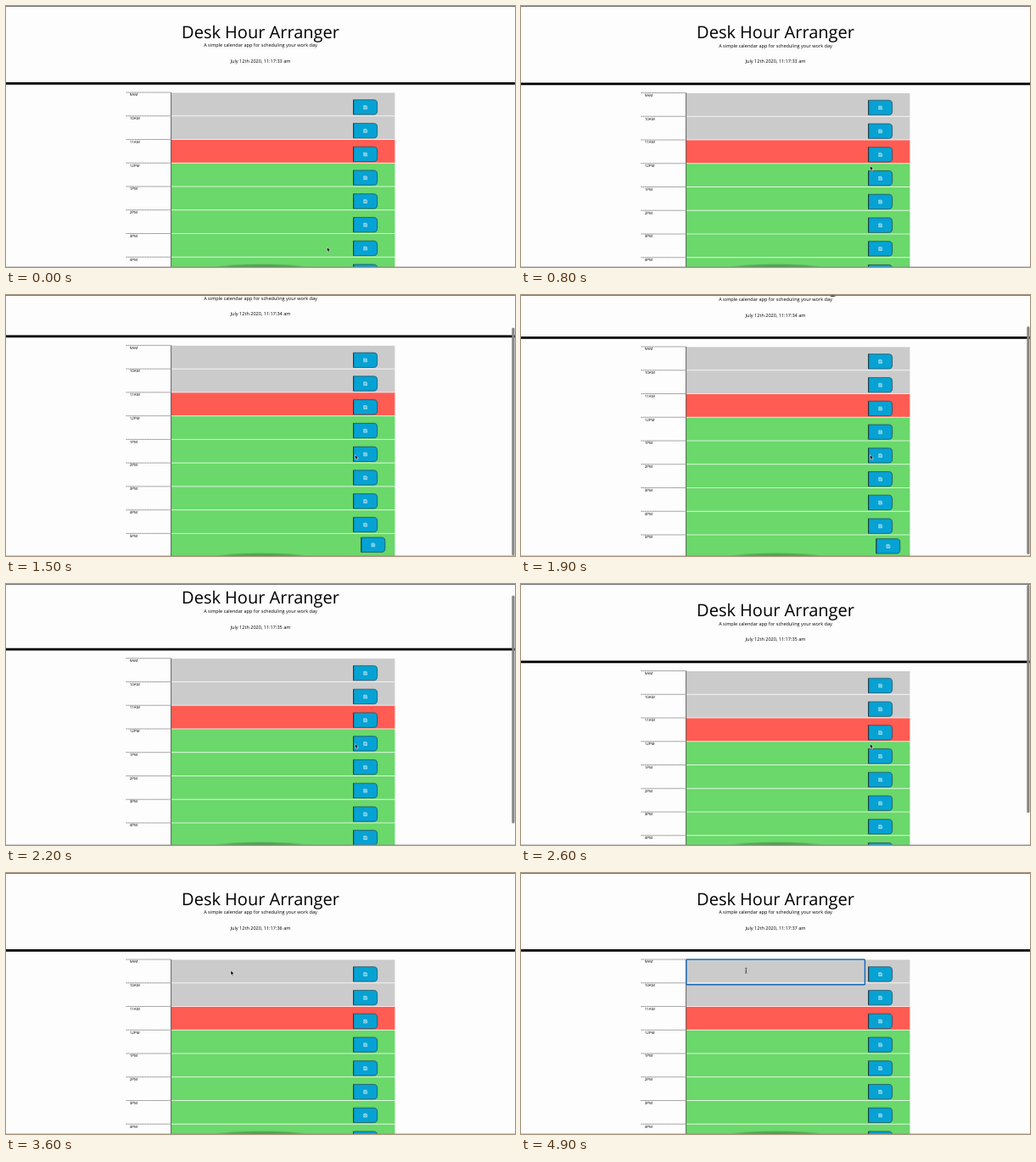
Recreate the animation shown at these times as an HTML page. Size 600 px wide and 308 px high, loop 5 s.

```html
<!DOCTYPE html>
<html lang="en">
<head>
<meta charset="utf-8">
<title>Day planner</title>
<style>
  html, body { margin: 0; width: 100%; height: 100%; overflow: hidden; background: #fdfdfd; }
  svg { display: block; width: 100vw; height: 100vh; }
  text { font-family: "Open Sans", "Noto Sans", sans-serif; fill: #000; text-rendering: geometricPrecision; }
  .middle { text-anchor: middle; }
</style>
</head>
<body>
<svg id="stage" viewBox="0 0 600 308">
  <defs>
    <radialGradient id="shade">
      <stop offset="0" stop-color="#000" stop-opacity=".3"/>
      <stop offset=".7" stop-color="#000" stop-opacity=".2"/>
      <stop offset="1" stop-color="#000" stop-opacity="0"/>
    </radialGradient>
    <g id="save">
      <path d="M0 0H23.8Q28 0 28 4.2V13.2Q28 17.4 23.8 17.4H0Z" fill="#06a2d3" stroke="#1d4657" stroke-width=".7"/>
      <path d="M0 0V17.4" stroke="#111" stroke-width=".6"/>
      <path d="M12.1 6.9h3.1l.8.8v3.1h-3.9z M12.9 7v1.3h2V7 M13 10.7V9.4h2v1.3" fill="none" stroke="#e8f7fc" stroke-width=".55"/>
    </g>
  </defs>
  <rect width="600" height="308" fill="#fdfdfd"/>
  <g id="page">
    <text class="middle" x="300" y="37.5" font-size="20">Desk Hour Arranger</text>
    <text class="middle" x="300" y="48.3" font-size="5.56">A simple calendar app for scheduling your work day</text>
    <text class="middle" id="clock" x="300" y="66.9" font-size="5.56"></text>
    <rect y="90" width="600" height="2.8"/>
    <g id="rows"></g>
  </g>
  <rect id="ring" x="194.8" y="102" width="210.6" height="29.8" rx=".8" fill="none" stroke="#1667b7" stroke-width="1.4"/>
  <ellipse cx="301" cy="308" rx="55" ry="4" fill="url(#shade)"/>
  <rect width="600" height="1" fill="#777"/>
  <rect y="307.3" width="600" height=".7" fill="#888" opacity=".6"/>
  <rect id="thumb" x="596.3" width="3.2" height="269" rx="1.6" fill="#858585"/>
  <path id="arrow" d="M0 0V5.6L1.3 4.4L2.2 6.4L3.1 6L2.2 4.1H4Z" fill="#000" stroke="#fff" stroke-width=".5"/>
  <path id="beam" d="M264.2 112.2q1.1 0 1.1 .8q0-.8 1.1-.8M265.3 113V117.4M264.2 118.2q1.1 0 1.1-.8q0 .8 1.1 .8M264.6 115.8h1.4" fill="none" stroke="#222" stroke-width=".65"/>
</svg>
<script>
const LOOP = 5000, STEP = 100;
const ROW_TOP = 102, ROW_HEIGHT = 27.75;
const HOURS = ["9AM", "10AM", "11AM", "12PM", "1PM", "2PM", "3PM", "4PM", "5PM"];
const SCROLL = [
  [600, 0], [700, -0.5], [1100, -0.5], [1200, 4], [1300, 18], [1400, 33],
  [1500, 42.6], [1700, 43], [1800, 42.6], [1900, 41], [2000, 36], [2100, 27],
  [2200, 14.3], [2300, 0], [2400, -0.5], [2900, -0.5], [3000, 0]
];
const POINTER_X = [[0, 378.5], [100, 381], [300, 396], [500, 409], [600, 411.5],
  [2800, 411.5], [2900, 404], [3100, 350], [3300, 288], [3400, 272], [3600, 265]];
const POINTER_Y = [[0, 284.5], [100, 278], [300, 236], [500, 196], [600, 188.5],
  [2800, 188.5], [2900, 184], [3100, 158], [3300, 128], [3400, 120], [3600, 115]];
const SCROLLBAR = [[1100, 0], [1200, 1], [2900, 1], [3200, 0]];

const byId = id => document.getElementById(id);
const show = (id, visible) => byId(id).setAttribute("visibility", visible ? "visible" : "hidden");

function valueAt(keys, time) {
  const next = keys.findIndex(key => key[0] > time);
  if (next === 0) return keys[0][1];
  if (next < 0) return keys[keys.length - 1][1];
  const [t0, a] = keys[next - 1], [t1, b] = keys[next];
  return a + (b - a) * (time - t0) / (t1 - t0);
}

function rowColor(index) {
  return index < 2 ? "#cbcbcb" : index === 2 ? "#ff5c53" : "#6ad86a";
}

function rowMarkup(hour, index) {
  const y = ROW_TOP + index * ROW_HEIGHT;
  const last = index === HOURS.length - 1;
  const saveX = last ? 418.8 : 409.6;
  const saveY = y + (last ? 4.7 : 8.7);
  return `
    <rect x="194.5" y="${y}" width="263.9" height="${ROW_HEIGHT}" fill="${rowColor(index)}"/>
    <path d="M195 ${y}H458.4" stroke="#fff" stroke-width=".8" opacity=".9"/>
    <path d="M141.6 ${y}H194.4" stroke="#333" stroke-width=".7" stroke-dasharray="1.2 .8"/>
    <path d="M194.6 ${y}v${ROW_HEIGHT}" stroke="#333" stroke-width=".7"/>
    <text x="145.8" y="${y + 4.3}" font-size="4.44">${hour}</text>
    <use href="#save" x="${saveX}" y="${saveY}"/>`;
}

function draw(time) {
  const scroll = valueAt(SCROLL, time);
  byId("page").setAttribute("transform", `translate(0 ${-scroll})`);
  byId("clock").textContent = `July 12th 2020, 11:17:${33 + Math.floor(time / 1000)} am`;
  byId("thumb").setAttribute("y", 1 + Math.max(0, scroll) * 0.88);
  byId("thumb").setAttribute("opacity", valueAt(SCROLLBAR, time));
  byId("arrow").setAttribute("transform", `translate(${valueAt(POINTER_X, time)} ${valueAt(POINTER_Y, time)})`);
  show("arrow", time < 3800);
  show("beam", time >= 3800);
  show("ring", time >= 4200);
}

byId("rows").innerHTML = HOURS.map(rowMarkup).join("");
const start = performance.now();
function tick() {
  const elapsed = (performance.now() - start) % LOOP;
  draw(Math.floor(elapsed / STEP) * STEP);
  requestAnimationFrame(tick);
}
tick();
</script>
</body>
</html>
```
